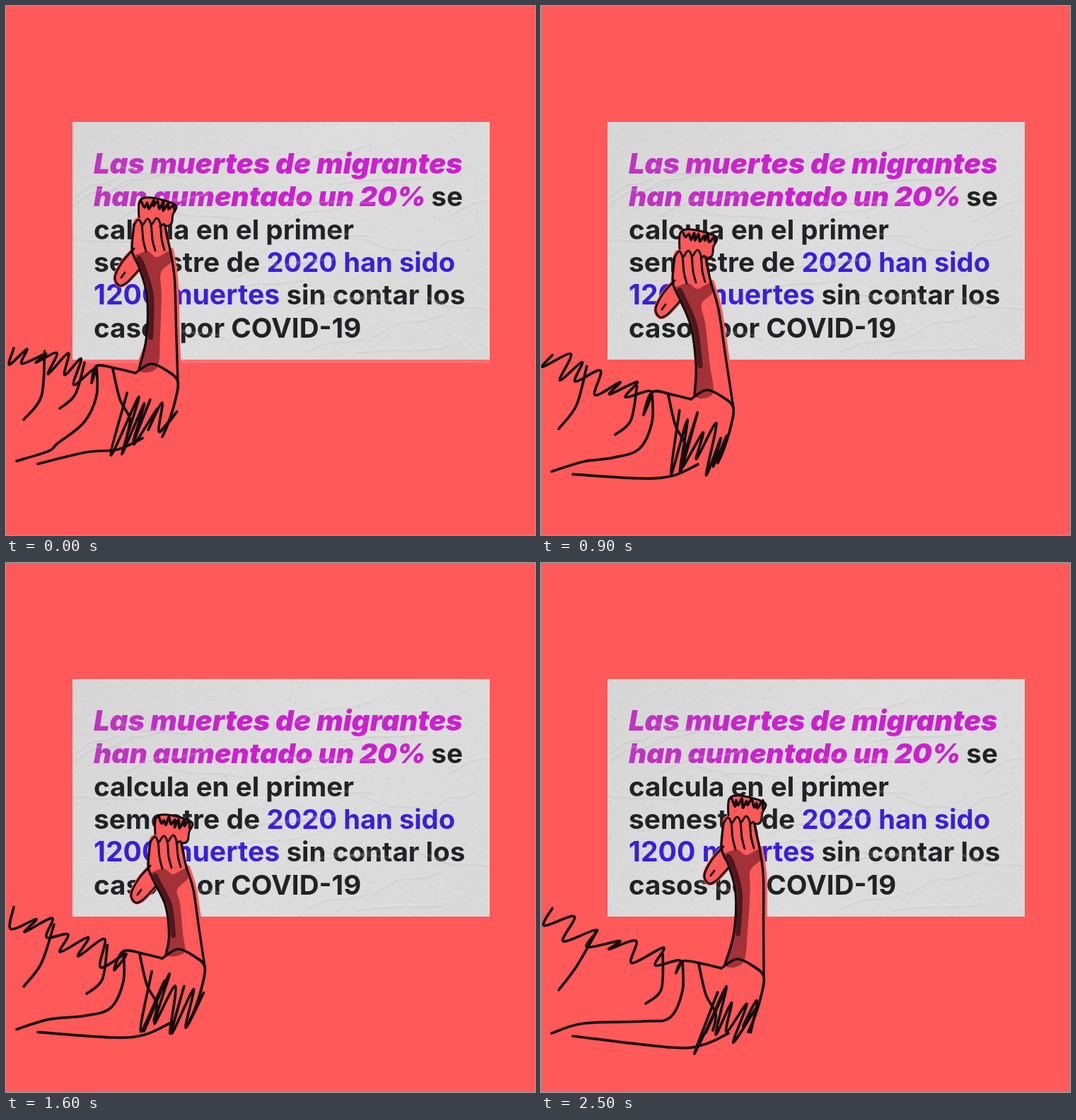
Animation of 748 by 748 pixels, one loop 2.6 s. Source, as an HTML page with a canvas:

```html
<!DOCTYPE html>
<html lang="es">
<head>
<meta charset="utf-8">
<style>
html, body { margin: 0; width: 100%; height: 100%; overflow: hidden; background: #ff5959; }
canvas { display: block; }
</style>
</head>
<body>
<canvas id="stage" width="748" height="748"></canvas>
<script>
const SIZE = 748, STEP = 100, LOOP = 2600;
const RED = '#ff5959', INK = '#160b0d', DARK = '#222224', BLUE = '#3b1edb';
const PANEL = { x: 94, y: 164, w: 590, h: 336 };
const g = document.getElementById('stage').getContext('2d');

// turning points of the brush strokes: step, hand, elbow
const keys = [
  { at: 0, hand: [205, 305], elbow: [243, 531] },
  { at: 3, hand: [216, 412], elbow: [258, 615] },
  { at: 6, hand: [222, 364], elbow: [263, 564] },
  { at: 7, hand: [222, 325], elbow: [265, 545] },
  { at: 9, hand: [213, 350], elbow: [272, 568] },
  { at: 11, hand: [215, 385], elbow: [272, 602] },
  { at: 13, hand: [212, 238], elbow: [278, 465] },
  { at: 16, hand: [228, 390], elbow: [281, 571] },
  { at: 17, hand: [235, 420], elbow: [284, 602] },
  { at: 19, hand: [258, 307], elbow: [293, 522] },
  { at: 22, hand: [276, 432], elbow: [308, 625] },
  { at: 24, hand: [280, 312], elbow: [316, 548] },
  { at: 25, hand: [282, 363], elbow: [315, 585] }
];

const lerp = (a, b, t) => a + (b - a) * t;
const mix = (p, q, t) => p.map((v, i) => lerp(v, q[i], t));
const ease = t => (1 - Math.cos(Math.PI * t)) / 2;
const from = ([x, y]) => (...p) => p.map((v, i) => v + (i % 2 ? y : x));
const reverse = p => p.map((_, i) => p[p.length - 2 - i + 2 * (i % 2)]);

function random(seed) {
  let s = seed * 7919 + 17;
  return (lo, hi) => lo + (hi - lo) * ((s = s * 16807 % 2147483647) / 2147483647);
}

function poseAt(step) {
  const next = keys.findIndex(k => k.at >= step);
  const b = keys[next], a = keys[Math.max(0, next - 1)];
  const t = a === b ? 0 : ease((step - a.at) / (b.at - a.at));
  return { hand: mix(a.hand, b.hand, t), elbow: mix(a.elbow, b.elbow, t) };
}

// smooth curve through all points
function trace(c, p) {
  const at = i => { const k = Math.max(0, Math.min(p.length / 2 - 1, i)) * 2; return [p[k], p[k + 1]]; };
  c.beginPath();
  c.moveTo(p[0], p[1]);
  for (let i = 0; i < p.length / 2 - 1; i++) {
    const [a, b, d, e] = [at(i - 1), at(i), at(i + 1), at(i + 2)];
    c.bezierCurveTo(b[0] + (d[0] - a[0]) / 6, b[1] + (d[1] - a[1]) / 6,
      d[0] - (e[0] - b[0]) / 6, d[1] - (e[1] - b[1]) / 6, d[0], d[1]);
  }
}
function line(p, width = 3, color = INK, c = g) {
  trace(c, p);
  c.lineWidth = width;
  c.strokeStyle = color;
  c.stroke();
}
function shape(p, color = RED) {
  trace(g, p);
  g.fillStyle = color;
  g.fill();
}

// strokes going to and fro between two edges
function scribble(rnd, n, top, bottom, jitter) {
  const p = [];
  for (let i = 0; i < n; i++) {
    for (const edge of [top, bottom]) {
      const [x, y] = edge(i / (n - 1));
      p.push(x + rnd(-jitter, jitter) / 2, y + rnd(-jitter, jitter));
    }
  }
  return p;
}

function forearm({ hand: [x, y], elbow: [ex, ey] }) {
  const wrist = [x + 27, y + 40];
  const o1 = mix(wrist, [ex, ey], .22), o2 = mix(wrist, [ex, ey], .6);
  o1[0] += 4;
  o2[0] += 2;
  return {
    outer: [...wrist, ...o1, ...o2, ex, ey],
    inner: [x - 17, y + 64, o1[0] - 39, o1[1] + 24, o2[0] - 42, o2[1] + 12, ex - 55, ey - 17]
  };
}

function drawBrush(h, rnd) {
  const body = h(-17, -4, -16, -29, 0, -34, 34, -24, 31, -10, 24, 6, -17, -4);
  shape(body);
  line(body);
  const [x, y] = h(-12, -30);
  line(scribble(rnd, 7, t => [x + 43 * t, y + 5 * t], t => [x + 3 + 41 * t, y + 9 + 5 * t], 3), 3.6);
}

function drawShade(h, inner) {
  const edge = [];
  for (let i = 0; i < inner.length; i += 2) edge.push(inner[i] + 22 + 4 * Math.cos(i), inner[i + 1] - 3);
  shape([...h(-24, 48, -5, 42, 8, 50, 26, 42, 29, 56, 14, 72), ...edge.slice(2), ...reverse(inner)], 'rgba(70,12,22,.5)');
  line([...h(-17, 52), ...from([6, 0])(...inner.slice(0, 6))], 7, 'rgba(25,6,10,.6)');
}

function drawHand(pose, rnd) {
  const h = from(pose.hand);
  const { inner, outer } = forearm(pose);
  const handle = h(-24, 38, -40, 56, -51, 78, -45, 90, -34, 86, -17, 68);
  shape(handle);
  line(handle, 5, RED);
  drawBrush(h, rnd);
  shape([...h(-26, 42, -25, 0, -10, -5, 10, 0, 23, 12), ...outer, ...reverse(inner), ...h(-26, 42)]);
  line(from([2, 0])(...outer), 6, RED);
  drawShade(h, inner);

  line(handle);
  line(h(-42, 79, -37, 72));
  for (let i = 0; i < 3; i++) {
    const x = -24 + 13 * i, y = 5 - i;
    line(h(x, y, x + 6, y - 8, x + 11, y, x + 13, y + 21, x + 17, y + 37));
  }
  line(h(13, 7, 19, 4, 23, 20));
  line([...h(-24, 4, -27, 38, -22, 54), ...inner], 3.4);
  line([...h(20, 6, 23, 22), ...outer], 3.4);
}

function drawSleeve({ elbow: [ex, ey] }, rnd) {
  const e = from([ex, ey]);
  const top = 480 + .35 * (ey - 540), low = 435 + .4 * ey, seam = ex - 115;
  const edge = t => [lerp(15, seam, t), lerp(top, ey - 22, t)];
  const cuff = e(-60, -12, -38, -25, -15, -15, 0, 0, -4, 28, -14, 60, -22, 78);
  const hem = [45, low, ...e(-130, 100, -85, 96, -50, 80)];

  const folds = scribble(rnd, 7, edge, t => {
    const [x, y] = edge(t);
    return [x - 10, y + 24];
  }, 9);
  return {
    fill: [15, top, ...edge(1), ...cuff, ...hem.slice(2, 6), 15, low],
    lines: [
      [...folds, ...edge(1), ...e(-85, -18, -60, -12)],
      cuff,
      hem,
      [...edge(1), seam, ey + 20, seam - 18, ey + 58, seam - 55, lerp(ey, low, .75), 60, low - 18, 15, low - 4],
      [...edge(.35), 50, top + 75, 25, top + 108],
      [...edge(.85), seam - 30, ey + 18, seam - 52, ey + 38],
      e(-92, -18, -82, 25, -68, 52, -72, 76),
      scribble(rnd, 7, t => [ex - 70 + 62 * t, ey + 12 + 26 * t],
        t => [ex - 92 + 72 * t, ey + 96 - 22 * t], 14)
    ]
  };
}

function drawArm(step) {
  const pose = poseAt(step), rnd = random(step + 1);
  const sleeve = drawSleeve(pose, rnd);
  shape(sleeve.fill);
  drawHand(pose, rnd);
  sleeve.lines.forEach(p => line(p, 3.7));
}

const bold = px => `700 ${px}px Inter, "Open Sans", sans-serif`;
const heavy = px => `italic 900 ${px}px Inter, "Open Sans", sans-serif`;

function drawText(c) {
  const pink = c.createLinearGradient(124, 0, 330, 0);
  pink.addColorStop(0, '#bd37be');
  pink.addColorStop(1, '#cb20cf');
  const rows = [
    [['Las muertes de migrantes', heavy(40), pink]],
    [['han aumentado un 20% ', heavy(39), pink], ['se', bold(38.6), DARK]],
    [['calcula en el primer', bold(38.6), DARK]],
    [['semestre de ', bold(39), DARK], ['2020 han sido', bold(38.2), BLUE]],
    [['1200 muertes ', bold(39.2), BLUE], ['sin contar los', bold(38.6), DARK]],
    [['casos por COVID-19', bold(38.6), DARK]]
  ];
  rows.forEach((row, i) => {
    let x = 124;
    for (const [text, font, color] of row) {
      c.font = font;
      c.fillStyle = color;
      c.fillText(text, x, 237 + 46.3 * i);
      x += c.measureText(text).width;
    }
  });
}

function makeSheet() {
  const sheet = document.createElement('canvas');
  sheet.width = sheet.height = SIZE;
  const c = sheet.getContext('2d');
  const { x, y, w, h } = PANEL;
  const rnd = random(7);
  c.beginPath();
  c.rect(x, y, w, h);
  c.clip();
  const paper = c.createLinearGradient(x, y, x + w, y + h);
  paper.addColorStop(0, '#d6d6d6');
  paper.addColorStop(.5, '#dddddd');
  paper.addColorStop(1, '#d9d9d9');
  c.fillStyle = paper;
  c.fillRect(x, y, w, h);
  for (let i = 0; i < 1800; i++) {
    c.fillStyle = i % 2 ? 'rgba(255,255,255,.2)' : 'rgba(120,120,120,.1)';
    c.fillRect(rnd(x, x + w), rnd(y, y + h), rnd(1, 4), rnd(1, 2));
  }
  drawText(c);

  c.lineCap = 'round';
  c.filter = 'blur(1px)';
  for (let i = 0; i < 26; i++) {
    const p = from([rnd(x - 30, x + w - 30), rnd(y, y + h)]);
    const len = rnd(50, 140), rise = rnd(-.45, .25) * len;
    const crease = p(0, 0, len * .35, rise * .6, len * .7, rise * .7, len, rise);
    line(crease, 1.6, 'rgba(100,100,100,.16)', c);
    line(from([0, -2])(...crease), 2, 'rgba(255,255,255,.26)', c);
  }
  return sheet;
}

const sheet = makeSheet();
g.lineCap = g.lineJoin = 'round';

function draw() {
  const step = Math.floor(performance.now() % LOOP / STEP);
  g.fillStyle = RED;
  g.fillRect(0, 0, SIZE, SIZE);
  g.drawImage(sheet, 0, 0);
  if (step === 0) {
    g.fillStyle = 'rgba(255,255,255,.14)';
    g.fillRect(PANEL.x, PANEL.y + PANEL.h, PANEL.w, 5);
  }
  drawArm(step);
  requestAnimationFrame(draw);
}
draw();
</script>
</body>
</html>
```
